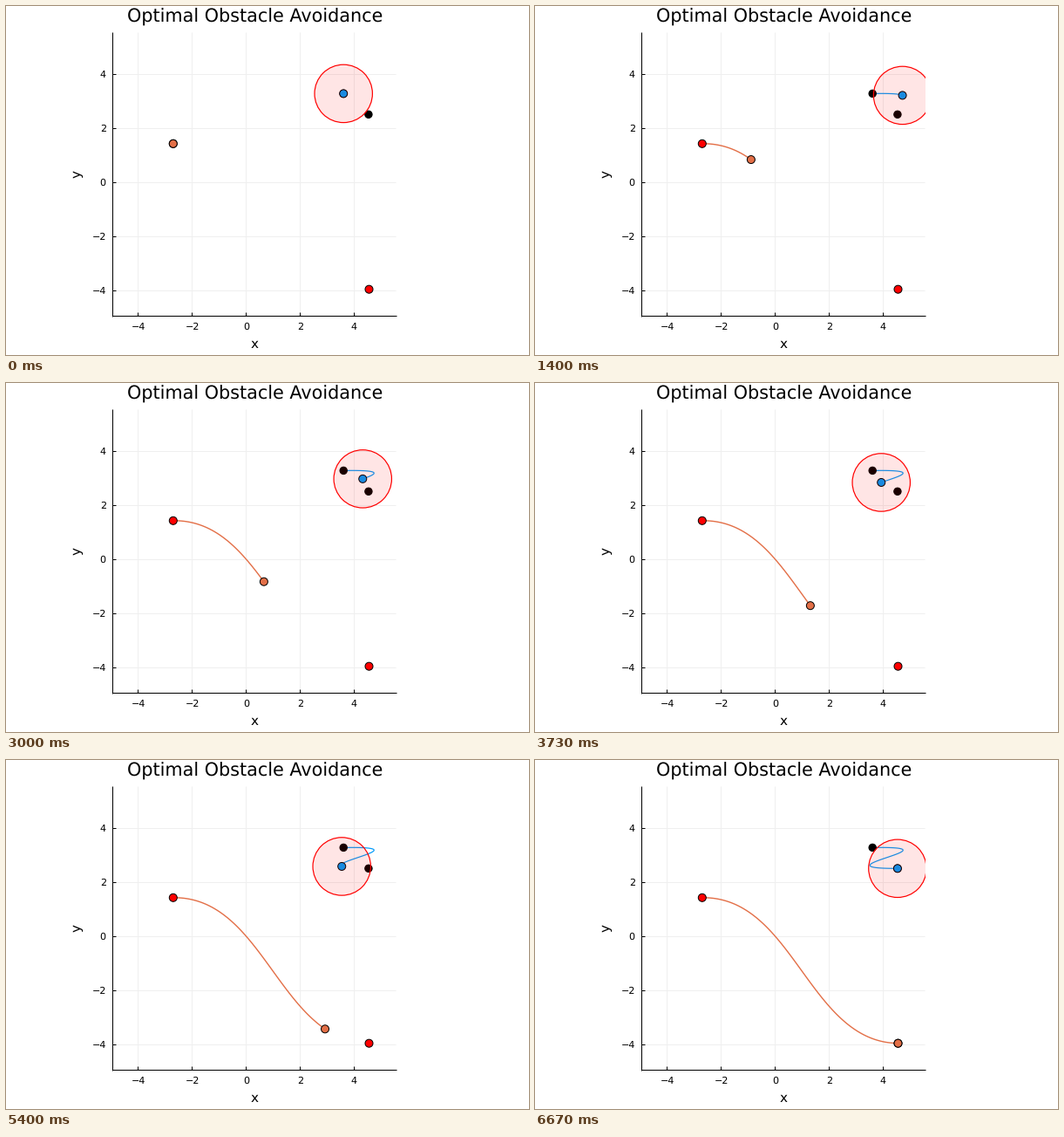
These frames come from a looping animation (600 px wide and 400 px high, 6740 ms). A matplotlib script:

```python
import matplotlib.pyplot as plt
import numpy as np
from matplotlib.animation import FuncAnimation
from matplotlib.patches import Circle, Rectangle

W, H, DPI = 600, 400, 100
PX = 72 / DPI                       # points per pixel
STEPS, LOOP, TICK = 100, 6740, 20   # path steps, loop and redraw time in ms
STEP_MS = 200 / 3                   # 15 steps per second
LEFT, RIGHT, TOP, BOTTOM = 122, 447, 30, 355
X0, Y0, UNIT = 275, 202, 30.98      # plot origin and scale in pixels
RADIUS = 33.2
BLUE, ORANGE = "#009afa", "#e36f47"

plt.rcParams.update({"font.family": "DejaVu Sans", "text.hinting": "none"})


def cubic(start, end, a, b, u):
    """Cubic from start to end; a and b are the extra end speeds."""
    return start + (end - start) * u + u * (1 - u) * (a * (1 - u) - b * u)


u = np.linspace(0, 1, STEPS + 1)
runner = np.column_stack([cubic(191.8, 416.5, 90, 83.5, u),
                          cubic(157.8, 324.7, -171.5, -163, u)])
guard = np.column_stack([cubic(387.2, 415.9, 288, 270, u),
                         cubic(100.4, 124.3, -29.5, -24.5, u)])

fig = plt.figure(figsize=(W / DPI, H / DPI), dpi=DPI, facecolor="white")
ax = fig.add_axes([0, 0, 1, 1])
ax.set_xlim(0, W)
ax.set_ylim(H, 0)
ax.axis("off")


def line(xs, ys, color="black", width=1, z=1):
    return ax.plot(xs, ys, color=color, lw=width * PX, zorder=z,
                   solid_capstyle="butt")[0]


def disc(pos, radius, fill, edge="black", width=1, z=3):
    return ax.add_patch(Circle(pos, radius, fc=fill, ec=edge, lw=width * PX,
                               zorder=z))


def label(x, y, text, size, ha="center", **kw):
    ax.text(x, y, text, fontsize=size, ha=ha, va="baseline", **kw)


# Grid, ticks and axes
for v in range(-4, 5, 2):
    x, y = X0 + v * UNIT, Y0 - v * UNIT
    text = str(v).replace("-", "\u2212")
    line([x, x], [TOP, BOTTOM], "#efefef")
    line([LEFT, RIGHT], [y, y], "#efefef")
    line([x, x], [BOTTOM - 4, BOTTOM], z=6)
    line([LEFT, LEFT + 4], [y, y], z=6)
    label(x + 0.5, 371, text, 8)
    label(114.8, y + 4.2, text, 8, ha="right")
line([LEFT, LEFT], [TOP, BOTTOM + 1], z=6)
line([LEFT, RIGHT + 1], [BOTTOM, BOTTOM], z=6)

label(285.8, 18.2, "Optimal Obstacle Avoidance", 14.91)
label(284.6, 392, "x", 11)
label(85, 192, "y", 11, rotation=90, rotation_mode="anchor")

# Start and goal points
for path, color, radius in ((runner, "red", 4.5), (guard, "black", 4.2)):
    disc(path[0], radius, color)
    disc(path[-1], radius, color)

trails = [line([], [], BLUE, 1.2, 2), line([], [], ORANGE, 1.4, 2)]
heads = [disc(guard[0], 4.5, BLUE, z=4), disc(runner[0], 4.5, ORANGE, z=4)]

zone = disc(guard[0], RADIUS, (1, 0, 0, 0.1), "red", 1.2, z=5)
zone.set_clip_path(Rectangle((LEFT, TOP), RIGHT + 0.5 - LEFT, BOTTOM - TOP,
                             transform=ax.transData))


def draw(i):
    # The path advances at the tick nearest to each step's start
    k = min(int((i * TICK + 14) / STEP_MS), STEPS)
    for path, trail, head in zip((guard, runner), trails, heads):
        trail.set_data(path[:k + 1, 0], path[:k + 1, 1])
        head.center = tuple(path[k])
    zone.center = tuple(guard[k])
    return [*trails, *heads, zone]


anim = FuncAnimation(fig, draw, frames=LOOP // TICK, init_func=lambda: draw(0),
                     interval=TICK, repeat=True, repeat_delay=0)
plt.show()
```
